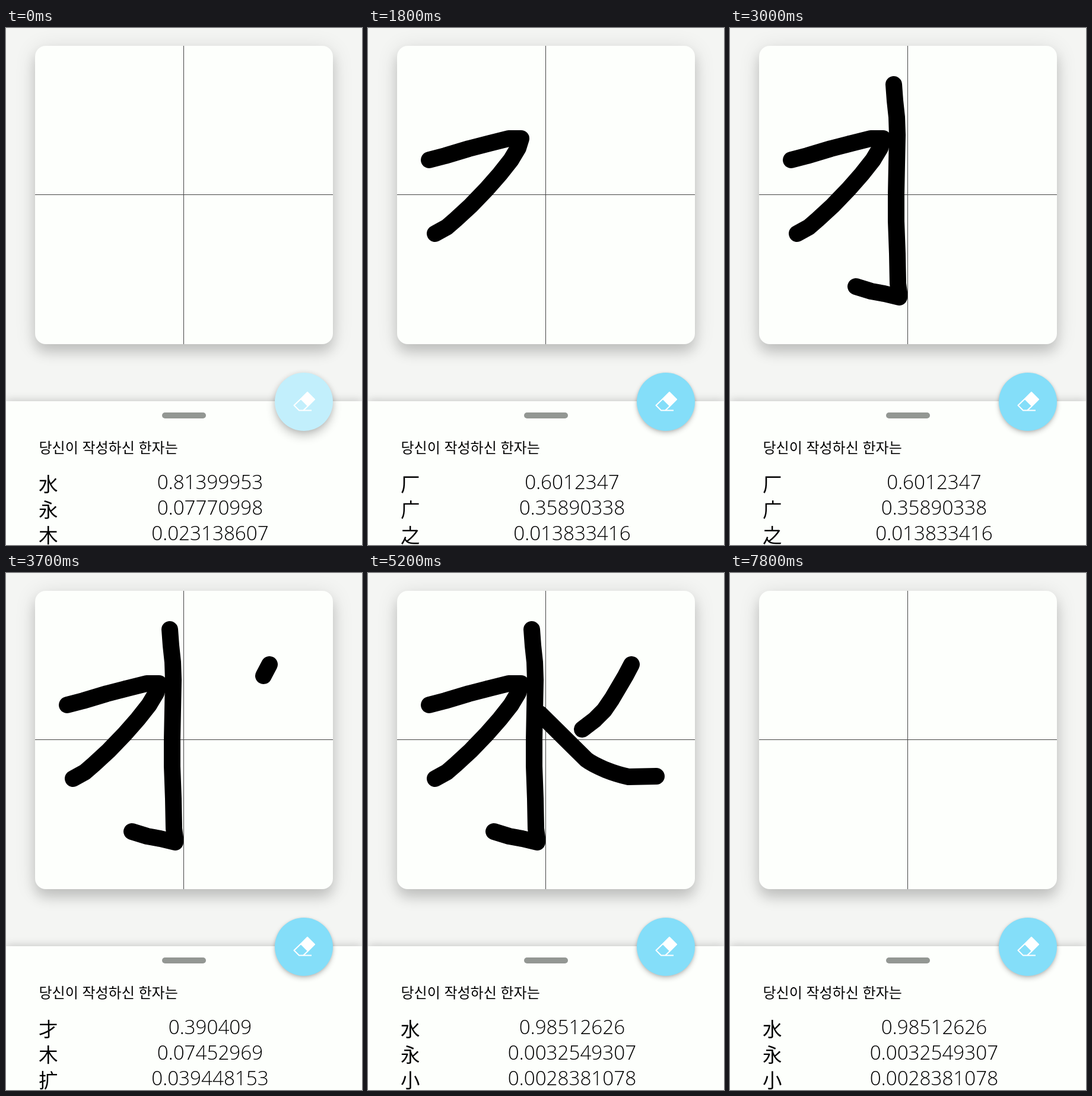
Write an HTML page that moves like this. It is 600x870 px and loops after 8 s.

```html
<!DOCTYPE html>
<html lang="ko">
<head>
<meta charset="utf-8">
<style>
  html, body { margin: 0; width: 100%; height: 100%; overflow: hidden; background: #f4f5f3; }
  div, svg { position: absolute; }
  #card { left: 49px; top: 30px; width: 502px; height: 502px; border-radius: 18px; background: #fdfffc;
    box-shadow: 0 14px 20px rgba(0,0,0,.15), 0 5px 36px rgba(0,0,0,.12); }
  #sheet { left: 0; top: 628px; width: 600px; height: 242px; background: #fdfffc;
    box-shadow: 0 -1px 14px rgba(0,0,0,.2); }
  #handle { left: 263px; top: 646.5px; width: 74px; height: 10px; border-radius: 5px; background: #939793; }
  #button { left: 453px; top: 579.5px; width: 98px; height: 98px; border-radius: 50%; }
  svg { left: 0; top: 0; }
  text { font-family: "Noto Sans CJK KR", "Noto Sans CJK", "Noto Sans CJK JP", sans-serif; fill: #000; }
  .hanja { font-size: 32.5px; font-weight: 300; }
  .score { font: 300 33.2px "Open Sans", "Noto Sans", sans-serif; text-anchor: middle; }
</style>
</head>
<body>
<div id="card"></div>
<div id="sheet"></div>
<div id="handle"></div>
<div id="button"></div>
<svg width="600" height="870" viewBox="0 0 600 870">
  <path d="M299.5 30V532M49 280.5H551" stroke="#444"/>
  <g id="ink" fill="none" stroke="#000" stroke-width="28" stroke-linecap="round" stroke-linejoin="round"></g>
  <g stroke="#fff" stroke-width="2" stroke-linejoin="round">
    <path d="M508 613L520 625L509 636L497 624Z" fill="#fff"/>
    <path d="M497 624L485.5 635L494 643.5H501L509 636M494 643.5H515" fill="none"/>
  </g>
  <text x="55.5" y="715" font-size="24">당신이 작성하신 한자는</text>
  <g id="results"></g>
</svg>
<script>
const LOOP = 8000, STEP = 100, CLEAR_AT = 7700;
const $ = id => document.getElementById(id);

// Each stroke: its path and [time, drawn fraction] keys
const strokes = [
  ['M103 222L130 215L170 203L205 194L237 186H258L253 202L241 222L222 246L200 271L173 299L148 322L133 335L113 346',
    [[700, 0], [900, .425], [1100, .425], [1600, .98], [1800, 1]]],
  ['M276 95L278 122L281 150L282 180L281 230L280 280V325L282 380L283 430L285 445V453L260 447L238 443L212 435',
    [[2000, 0], [2600, .81], [2900, .975], [3000, 1]]],
  ['M444 154L434 173L424 190L411 212L398 231L382 247L361 263',
    [[3600, 0], [3700, .155], [4000, 1]]],
  ['M290 237L368 314Q377 321 400 331Q420 339 439 343L486 342',
    [[4200, 0], [4800, 1]]]
];

const guesses = [
  [0, '水永木', ['0.81399953', '0.07770998', '0.023138607']],
  [1800, '厂广之', ['0.6012347', '0.35890338', '0.013833416']],
  [3300, '才木扩', ['0.390409', '0.07452969', '0.039448153']],
  [4300, '水才小', ['0.51273842', '0.21846092', '0.046317205']],
  [5200, '水永小', ['0.98512626', '0.0032549307', '0.0028381078']]
];

const rippleKeys = [[0, .5], [400, 0], [7500, 0], [7600, .5], [7800, 0]];
const liftKeys = [[0, 1], [400, 0], [7400, 0], [7500, 1], [7700, 1], [7800, 0]];

function add(parent, tag, attrs) {
  const node = document.createElementNS('http://www.w3.org/2000/svg', tag);
  for (const name in attrs) node.setAttribute(name, attrs[name]);
  return parent.appendChild(node);
}

function valueAt(keys, t) {
  const next = keys.findIndex(key => key[0] > t);
  if (next === 0) return keys[0][1];
  if (next < 0) return keys[keys.length - 1][1];
  const [t0, a] = keys[next - 1], [t1, b] = keys[next];
  return a + (b - a) * (t - t0) / (t1 - t0);
}

const inkPaths = strokes.map(([d]) => add($('ink'), 'path', { d, pathLength: 1 }));
const rows = [0, 1, 2].map(i => ({
  hanja: add($('results'), 'text', { class: 'hanja', x: 55, y: 779.5 + 43 * i }),
  score: add($('results'), 'text', { class: 'score', x: 344, y: 776 + 43 * i })
}));

function render(t) {
  strokes.forEach(([, keys], i) => {
    const drawn = t < CLEAR_AT ? valueAt(keys, t) : 0;
    inkPaths[i].style.display = drawn ? '' : 'none';
    inkPaths[i].style.strokeDasharray = drawn < 1 ? `${drawn} 2` : 'none';
  });

  const [, chars, scores] = guesses.filter(guess => guess[0] <= t).pop();
  rows.forEach((row, i) => {
    row.hanja.textContent = chars[i];
    row.score.textContent = scores[i];
  });

  const ripple = valueAt(rippleKeys, t), lift = valueAt(liftKeys, t);
  const tint = [132, 222, 249].map(c => c + (255 - c) * ripple);
  $('button').style.background = `rgb(${tint})`;
  $('button').style.boxShadow =
    `0 ${4 + 5 * lift}px ${9 + 7 * lift}px rgba(0,0,0,.2), 0 1px ${4 + 4 * lift}px rgba(0,0,0,.12)`;
}

function tick() {
  const t = performance.now() % LOOP;
  render(Math.floor(t / STEP) * STEP);
  requestAnimationFrame(tick);
}
tick();
</script>
</body>
</html>
```
